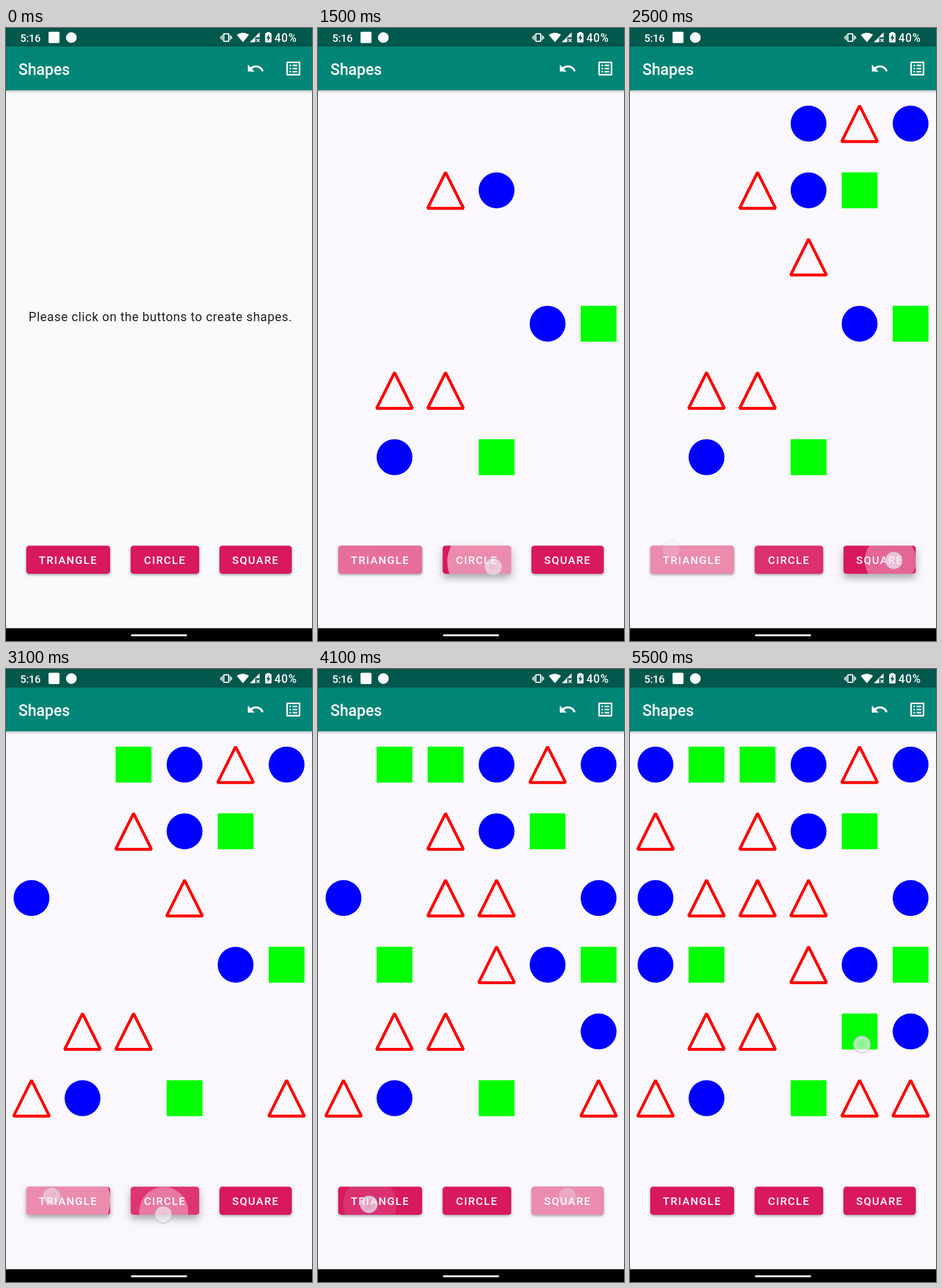
Recreate the animation shown at these times as an HTML page with a canvas. Size 529 px wide and 1058 px high, loop 6 s.

```html
<!DOCTYPE html>
<html lang="en">
<head>
<meta charset="utf-8">
<title>Shapes</title>
<style>
html, body { margin: 0; width: 100%; height: 100%; overflow: hidden; background: #faf8fc; }
canvas { display: block; }
</style>
</head>
<body>
<canvas id="stage" width="529" height="1058"></canvas>
<script>
const ctx = document.getElementById('stage').getContext('2d');
const W = 529, H = 1058, LOOP = 6000, DP = 1.34;
const STATUS = '#00574c', BAR = '#008577', PINK = '#d8185f';

const buttons = {
  T: { label: 'TRIANGLE', x: 35, w: 145, touch: [80, 914] },
  C: { label: 'CIRCLE', x: 215.5, w: 118.5, touch: [282, 934] },
  S: { label: 'SQUARE', x: 369, w: 125, touch: [448, 914] }
};
const BTN_Y = 893.5, BTN_H = 48.5, RELEASE = 75;

// press time, button, column, row, optional finger position
const taps = [
  [520, 'T', 1, 4], [644, 'C', 3, 1], [768, 'S', 5, 3], [892, 'T', 2, 4],
  [1016, 'C', 4, 3], [1140, 'S', 3, 5], [1264, 'T', 2, 1], [1390, 'C', 1, 5, 303, 930],
  [1570, 'S', 4, 1], [1745, 'T', 4, 0], [1920, 'C', 3, 0], [2190, 'C', 5, 0],
  [2300, 'T', 3, 2, 71, 899], [2470, 'S', 2, 0, 456, 919], [2620, 'T', 0, 5],
  [2795, 'C', 0, 2], [2960, 'T', 5, 5, 79, 910], [3070, 'C', 5, 2, 272, 942],
  [3240, 'T', 2, 2], [3410, 'S', 1, 0], [3580, 'T', 3, 3], [3750, 'C', 5, 4],
  [3920, 'S', 1, 3, 431, 910], [4090, 'T', 0, 1, 88, 924], [4270, 'C', 0, 3],
  [4385, 'T', 1, 2, 81, 922], [4495, 'S', 4, 4, 466, 912], [4680, 'C', 0, 0],
  [4860, 'T', 4, 5]
].map(([time, kind, col, row, x, y]) => {
  const [tx, ty] = buttons[kind].touch;
  return { time, kind, col, row, x: x ?? tx, y: y ?? ty };
});

const clamp = v => Math.max(0, Math.min(1, v));
const mix = (a, b, k) => a + (b - a) * k;

function rect(color, x, y, w, h) {
  ctx.fillStyle = color;
  ctx.fillRect(x, y, w, h);
}
function disc(color, x, y, r) {
  ctx.fillStyle = color;
  ctx.beginPath();
  ctx.arc(x, y, r, 0, Math.PI * 2);
  ctx.fill();
}
function roundRect(color, x, y, w, h, r) {
  ctx.fillStyle = color;
  ctx.beginPath();
  ctx.roundRect(x, y, w, h, r);
  ctx.fill();
}
function polygon(color, ...points) {
  ctx.fillStyle = color;
  ctx.beginPath();
  points.forEach(p => ctx.lineTo(...p));
  ctx.closePath();
  ctx.fill();
}
function text(str, x, y, size, weight, color, spacing = 0) {
  ctx.font = `${weight} ${size}px Roboto, sans-serif`;
  ctx.letterSpacing = spacing + 'px';
  ctx.fillStyle = color;
  ctx.fillText(str, x, y);
}
function icon(path, x, y) {
  ctx.save();
  ctx.translate(x, y);
  ctx.scale(DP, DP);
  ctx.fillStyle = '#fff';
  ctx.fill(path, 'evenodd');
  ctx.restore();
}

const undoIcon = new Path2D('M12.5 8c-2.65 0-5.05 1-6.9 2.6L2 7v9h9l-3.62-3.62c1.39-1.16 3.16-1.88 5.12-1.88 3.54 0 6.55 2.31 7.6 5.5l2.37-.78C21.08 11.03 17.15 8 12.5 8z');
const listIcon = new Path2D('M4 3h16q1 0 1 1v16q0 1-1 1H4q-1 0-1-1V4q0-1 1-1zM5 5v14h14V5z' +
  [7, 11, 15].map(y => `M7 ${y}h2v2h-2zM11 ${y}h6v2h-6z`).join(''));

function statusBar() {
  rect(STATUS, 0, 0, W, 32);
  text('5:16', 24.5, 23.5, 18.5, 500, '#fff', -0.3);
  roundRect('#fff', 73.5, 6.5, 19, 19.5, 2);
  disc('#fff', 113, 16.5, 9.3);

  ctx.strokeStyle = '#fff';
  ctx.lineWidth = 2;
  ctx.strokeRect(376.5, 10, 8.5, 13);
  for (const [dx, half] of [[7, 4.5], [9.3, 2.5]])
    for (const side of [-1, 1])
      rect('#fff', 380.7 + side * dx - 0.8, 16.5 - half, 1.6, half * 2);

  ctx.fillStyle = '#fff';
  ctx.beginPath();
  ctx.moveTo(409.5, 24.5);
  ctx.lineTo(399, 12);
  ctx.quadraticCurveTo(409.5, 4.5, 420, 12);
  ctx.fill();

  polygon('#fff', [421.5, 24.5], [438.5, 7.5], [438.5, 16], [431, 16], [431, 24.5]);
  ctx.lineWidth = 1.7;
  ctx.beginPath();
  ctx.moveTo(433, 18.5); ctx.lineTo(438.5, 24);
  ctx.moveTo(438.5, 18.5); ctx.lineTo(433, 24);
  ctx.stroke();

  rect('#fff', 451, 7, 5, 3);
  roundRect('#fff', 448, 8.5, 11, 16.5, 1.5);
  polygon(STATUS, [454.5, 10.5], [450, 17.8], [452.8, 17.8], [452.5, 23], [457, 15.8], [454.3, 15.8]);
  text('40%', 464, 23.5, 19.5, 500, '#fff', 0.9);
}

function chrome() {
  const shade = ctx.createLinearGradient(0, 107, 0, 113);
  shade.addColorStop(0, 'rgba(0,0,0,.2)');
  shade.addColorStop(1, 'rgba(0,0,0,0)');
  rect(shade, 0, 107, W, 6);
  rect(BAR, 0, 32, W, 75.5);
  statusBar();
  text('Shapes', 21.5, 81, 20 * DP, 500, '#fff');
  icon(undoIcon, 415.3, 53.9);
  icon(listIcon, 480.6, 53.9);
  rect('#000', 0, 1036, W, 22);
  roundRect('#fff', 216, 1046.5, 97, 3.2, 1.6);
}

function shape({ kind, col, row }) {
  const size = 62, x = 13.1 + col * 88.2, y = 134 + row * 115.15;
  if (kind === 'S') return rect('#0f0', x, y, size, size);
  if (kind === 'C') return disc('#00f', x + size / 2, y + size / 2, size / 2);
  ctx.strokeStyle = '#f00';
  ctx.lineWidth = 5;
  ctx.lineJoin = 'bevel';
  ctx.beginPath();
  ctx.moveTo(x + size / 2, y);
  ctx.lineTo(x, y + size);
  ctx.lineTo(x + size, y + size);
  ctx.closePath();
  ctx.stroke();
}

function ripple(b, tap, age) {
  const grow = clamp(age / 155), k = grow * (1.25 - 0.25 * grow);
  const alpha = 0.5 * clamp(age / 45) * clamp((340 - age) / 140);
  if (alpha <= 0) return;
  disc(`rgba(255,255,255,${alpha})`,
    mix(tap.x, b.x + b.w / 2, k),
    mix(tap.y, BTN_Y + BTN_H / 2, k),
    mix(b.w * 0.3, Math.hypot(b.w, BTN_H) / 2 + 1, k));
}

function button(kind, now) {
  const b = buttons[kind];
  const recent = taps.filter(t => t.kind === kind && t.time <= now && now - t.time < 340);
  const lift = Math.max(0, ...recent.map(t => {
    const age = now - t.time;
    return clamp((age - 10) / 20) * clamp((165 - age) / 50);
  }));
  ctx.save();
  ctx.shadowColor = `rgba(0,0,0,${mix(0.35, 0.32, lift)})`;
  ctx.shadowBlur = mix(4, 13, lift);
  ctx.shadowOffsetY = mix(2, 7, lift);
  roundRect(PINK, b.x, BTN_Y, b.w, BTN_H, 5);
  ctx.restore();

  ctx.save();
  ctx.beginPath();
  ctx.roundRect(b.x, BTN_Y, b.w, BTN_H, 5);
  ctx.clip();
  recent.forEach(t => ripple(b, t, now - t.time));
  ctx.restore();

  ctx.textAlign = 'center';
  text(b.label, b.x + b.w / 2, 925.3, 14 * DP, 500, '#fff', 1.68);
  ctx.textAlign = 'left';
}

function finger(x, y, age) {
  if (age < 0 || age > 240) return;
  ctx.save();
  ctx.globalAlpha = clamp((240 - age) / 140);
  const glow = ctx.createRadialGradient(x, y, 0, x, y, 15);
  glow.addColorStop(0, 'rgba(240,236,244,.55)');
  glow.addColorStop(1, 'rgba(240,236,244,.75)');
  disc(glow, x, y, 15);
  ctx.strokeStyle = 'rgba(178,170,215,.65)';
  ctx.lineWidth = 1.6;
  ctx.beginPath();
  ctx.arc(x, y, 14.5, 0, Math.PI * 2);
  ctx.stroke();
  ctx.restore();
}

function draw(now) {
  const placed = taps.filter(t => now >= t.time + RELEASE);
  rect(placed.length ? '#faf8fc' : '#f8fafc', 0, 0, W, H);
  if (!placed.length)
    text('Please click on the buttons to create shapes.', 39, 505.5, 16 * DP, 400, '#202122', 0.67);
  placed.forEach(shape);
  Object.keys(buttons).forEach(kind => button(kind, now));
  chrome();
  taps.forEach(t => finger(t.x, t.y, now - t.time));
  finger(401, 648, now - 5490);
}

function tick() {
  const t = performance.now() % LOOP;
  draw(t < 500 ? 0 : Math.min(5500, Math.floor(t / 100) * 100));
  requestAnimationFrame(tick);
}
tick();
</script>
</body>
</html>
```
